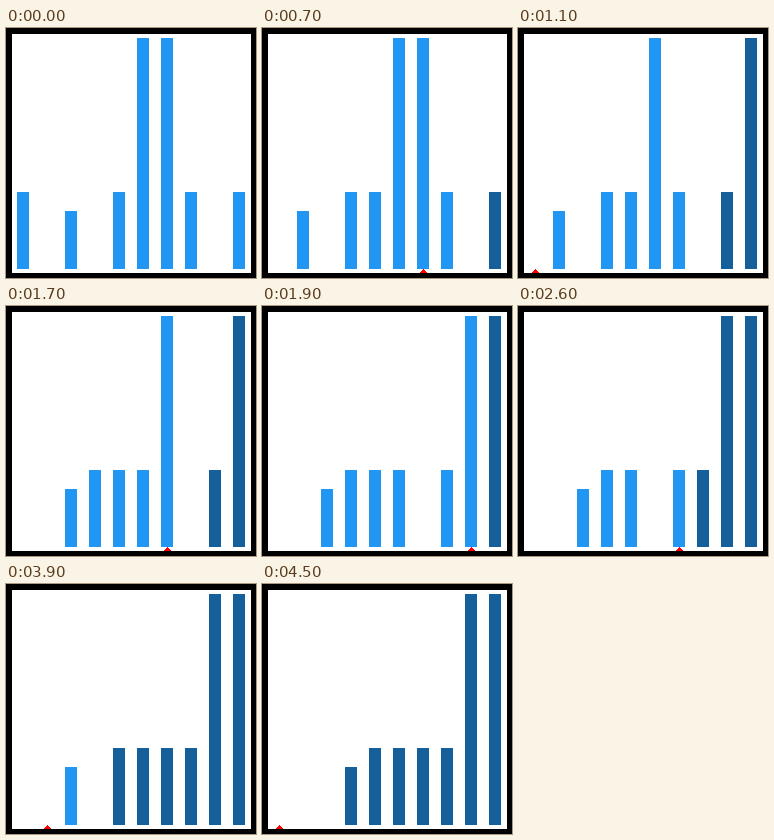
These frames come from a looping animation (250x250 px, 4600 ms). An HTML page with a canvas:

```html
<!DOCTYPE html>
<html lang="en">
<head>
<meta charset="utf-8">
<title>Bubble sort</title>
<style>
html, body { margin: 0; width: 100%; height: 100%; overflow: hidden; background: #000; }
canvas { display: block; }
</style>
</head>
<body>
<canvas id="stage" width="250" height="250"></canvas>
<script>
const ctx = document.getElementById("stage").getContext("2d");
const START = [4, 0, 3, 0, 4, 12, 12, 4, 0, 4];
const STEP = 100, BASE = 241, TALL = 231, TOP_VALUE = 12;
const LEFT = 11, PITCH = 24, BAR = 12;

// One step per comparison, plus one when the last comparison of a pass swaps.
function sortSteps(start) {
  const a = start.slice(), n = a.length;
  const steps = [];
  const add = (arrow, sorted) => steps.push({ bars: a.slice(), arrow, sorted });
  add(-1, n);
  for (let end = n - 1; end > 0; end--) {
    let moved = false;
    for (let j = 0; j < end; j++) {
      add(j, end);
      if (a[j] > a[j + 1]) {
        [a[j], a[j + 1]] = [a[j + 1], a[j]];
        moved = true;
        if (j + 1 === end) add(end, end);
      }
    }
    if (!moved) break;
  }
  add(0, 0);
  return steps;
}

const steps = sortSteps(START);

function rect(color, x, y, w, h) {
  ctx.fillStyle = color;
  ctx.fillRect(x, y, w, h);
}

function draw({ bars, arrow, sorted }) {
  rect("#000", 0, 0, 250, 250);
  rect("#fff", 6, 6, 239, 239);
  bars.forEach((v, i) => {
    const h = Math.round(v / TOP_VALUE * TALL);
    const done = i >= sorted && i !== arrow;
    rect(done ? "#15609b" : "#2196f3", LEFT + i * PITCH, BASE - h, BAR, h);
  });
  if (arrow >= 0) {
    const x = LEFT + arrow * PITCH + 6;
    for (let r = 0; r < 4; r++) rect("#f00", x - r, BASE + r, 2 * r + 1, 1);
  }
}

const t0 = performance.now();
function tick() {
  const k = Math.floor((performance.now() - t0) / STEP) % steps.length;
  draw(steps[k]);
  requestAnimationFrame(tick);
}
tick();
</script>
</body>
</html>
```
